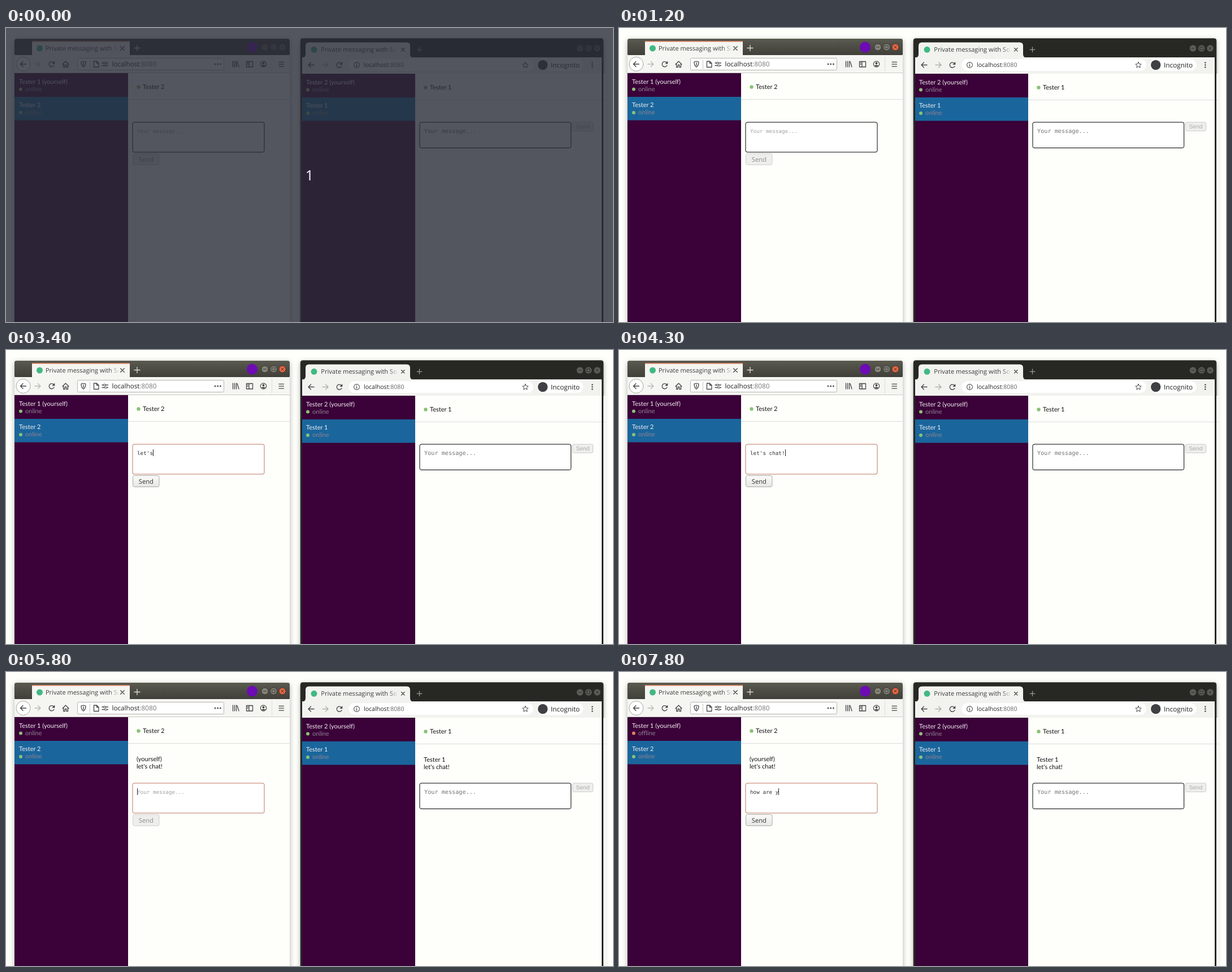
An HTML page that plays this animation: 1074x521 px, repeating every 8000 ms.

```html
<!DOCTYPE html>
<html lang="en">
<head>
<meta charset="utf-8">
<title>Private chat demo</title>
<style>
  html, body { margin: 0; width: 100%; height: 100%; overflow: hidden; background: #fefffb; }
  svg { display: block; width: 1074px; height: 521px; text-rendering: geometricPrecision; white-space: pre; }
  .ui { font-family: "Open Sans", "Noto Sans", sans-serif; }
  .page { font: 11px Lato, sans-serif; }
  .mono { font-family: "DejaVu Sans Mono", monospace; }
  .line { fill: none; stroke: #454545; stroke-width: 1.3; stroke-linecap: round; stroke-linejoin: round; }
</style>
</head>
<body>
<svg id="stage" viewBox="0 0 1074 521"></svg>
<script>
const LOOP = 8000, CHAR = 5.6;
const $ = id => document.getElementById(id);

const rect = (x, y, w, h, fill, extra = '') =>
  `<rect x="${x}" y="${y}" width="${w}" height="${h}" fill="${fill}" ${extra}/>`;
const disc = (x, y, r, fill, extra = '') =>
  `<circle cx="${x}" cy="${y}" r="${r}" fill="${fill}" ${extra}/>`;
const line = (d, extra = '') => `<path class="line" d="${d}" ${extra}/>`;
const label = (x, y, text, size, fill, cls = 'ui', extra = '') =>
  `<text x="${x}" y="${y}" class="${cls}" style="font-size:${size}px" fill="${fill}" ${extra}>${text}</text>`;

const cross = (x, y, r, extra) => line(`M${x - r} ${y - r}l${2 * r} ${2 * r}m0 ${-2 * r}l${-2 * r} ${2 * r}`, extra);
const plus = (x, y, r, color) => line(`M${x - r} ${y}h${2 * r}M${x} ${y - r}v${2 * r}`, `style="stroke:${color}"`);
const arrow = (x, y, dir, color) =>
  line(`M${x - 5 * dir} ${y}h${10 * dir}m${-4.5 * dir} -4.5l${4.5 * dir} 4.5l${-4.5 * dir} 4.5`, `style="stroke:${color}"`);
const reload = (x, y) =>
  line(`M${x + 4} ${y + 2.2}a4.6 4.6 0 1 1 -.3 -4.6`) +
  `<path d="M${x + 5.3} ${y - 5.5}v5h-5z" fill="#454545"/>`;

function windowButtons(xs, y, fill, ink, close = fill) {
  const style = `style="stroke:${ink};stroke-width:1"`;
  return xs.map((x, i) => disc(x, y, 6, i == 2 ? close : fill, 'stroke="#30302b" stroke-width=".8"')).join('') +
    line(`M${xs[0] - 2.5} ${y}h5M${xs[1] - 2.5} ${y - 2.5}h5v5h-5z`, style) +
    cross(xs[2], y, 2.2, style);
}

function user(y, name, id) {
  return label(23, y, name, 11, '#f4eef3', 'page') +
    disc(26, y + 9.8, 3, '#8bc176', `id="${id}Dot"`) +
    label(34, y + 13, 'online', 11, '#8f8292', 'page', `id="${id}"`);
}

function chat(id, me, other, width, author) {
  return rect(15, 80, width, 441, '#fefffb') +
    rect(15, 80, 201, 441, '#3a0238') + rect(15, 122, 201, 41.5, '#1a669c') +
    user(98.7, me + ' (yourself)', id + 'Me') + user(140.2, other, id + 'Other') +
    disc(234.5, 104.5, 3.2, '#8bc176') + label(242, 108, other, 11, '#111', 'page') +
    rect(216, 126, width - 201, 1, '#dcdddb') +
    `<g id="${id}Message">` +
      label(231, 157.5, author, 11, '#111', 'page', 'font-weight="bold"') +
      label(231, 170.7, "let's chat!", 11, '#111', 'page') +
    '</g>';
}

const leftBar = color => rect(15, 19, 487, 30, color, 'rx="4"');

const leftWindow =
  rect(15, 19, 487, 510, '#f5f5f1', 'rx="4" filter="url(#soft)"') +
  rect(15, 30, 487, 50, '#f5f5f1') + leftBar('url(#barIdle)') +
  windowButtons([458, 473.5, 489], 34, '#6b6a63', '#42413c') +
  '<g id="active">' +
    rect(15, 19, 487, 510, 'none', 'rx="4" filter="url(#lift)"') +
    leftBar('url(#barActive)') +
    windowButtons([458, 473.5, 489], 34, '#85847a', '#3c3b37', '#ec6540') +
  '</g>' +
  rect(46, 23, 173, 26, '#f5f5f1') + rect(46, 23, 173, 1.5, '#df7f5b') + rect(15, 48, 487, 31, '#f5f5f1') +
  rect(15, 79, 487, 1, '#cbcbc7') +
  disc(59.5, 36, 5.5, '#41b883') +
  label(70, 40, 'Private messaging with So', 11, 'url(#fadeL)') +
  cross(206, 36, 3.3) + plus(232, 35.5, 5, '#dedcd5') +
  disc(435.5, 34, 9.5, '#6d0bb4') +
  disc(30.5, 64, 12.5, '#fff', 'stroke="#a6a6a2"') + arrow(30.5, 64, -1, '#404040') + arrow(56, 64, 1, '#b8b8b5') +
  reload(81, 64) + line('M100 64.5l5.5 -5.5l5.5 5.5M101.7 63.5v6h2.6v-4h2.6v4h2.6v-6') +
  rect(126.5, 53.5, 259, 21, '#fff', 'rx="2" stroke="#b5b5b0"') +
  line('M137 59l4 1.2c0 5 -1.3 7.3 -4 9c-2.7 -1.7 -4 -4 -4 -9zM137 61.5v5') + rect(148, 56, 1, 17, '#c8c8c5') +
  line('M155.5 59h5l3.5 3.5v7h-8.5zM160.5 59v3.5h3.5') +
  line('M170 62h2m4 0h4.5M170 66.5h4.5m4 0h2') +
  disc(174, 62, 1.7, 'none', 'stroke="#454545"') + disc(176.5, 66.5, 1.7, 'none', 'stroke="#454545"') +
  label(187.5, 68.3, 'localhost<tspan fill="#777">:8080</tspan>', 11.7, '#222') +
  [370, 374.7, 379.4].map(x => disc(x, 64, 1.5, '#555')).join('') +
  line('M401.5 59v10M404.5 59v10M407.5 59v10M409 59.5l3 9.5') +
  line('M425.5 59.5h11v9.5h-11zM430 59.5v9.5M427.2 62h1M427.2 64.5h1') +
  disc(455.5, 64, 5.2, 'none', 'stroke="#454545" stroke-width="1.2"') + disc(455.5, 62.5, 1.9, '#454545') +
  '<path d="M452 66.5q3.5 -2 7 0q-3.5 3.5 -7 0z" fill="#454545"/>' +
  rect(470, 50, 1, 27, '#deded9') + line('M483 60.3h8.5M483 64.2h8.5M483 68.1h8.5') +
  chat('l', 'Tester 1', 'Tester 2', 487, '(yourself)') +
  '<g id="lForm">' +
    rect(224, 167, 233, 53, '#fff', 'id="box" rx="3" stroke="#000"') +
    label(232, 186, '', 9.3, '#333', 'mono', 'id="input"') +
    rect(0, 176, 1, 12, '#222', 'id="caret"') +
    rect(224.5, 222.5, 46.5, 20, '#eee', 'id="button" rx="3"') +
    label(234.8, 236.8, 'Send', 11.2, '#333', 'ui', 'id="send"') +
  '</g>';

const rightWindow =
  rect(521, 19, 536, 510, '#272824', 'rx="4" filter="url(#soft)"') +
  rect(521, 18.5, 536, 510, '#272824', 'rx="4" stroke="#484943" stroke-width=".7"') +
  '<path d="M524 52.5q6 0 6 -6v-15q0 -6 6 -6h173q6 0 6 6v15q0 6 6 6z" fill="#f2f3ef"/>' +
  rect(524, 52, 530, 29, '#f2f3ef') +
  disc(545, 38.3, 5.5, '#41b883') +
  label(557.3, 42.3, 'Private messaging with So', 11.1, 'url(#fadeR)') +
  cross(702.3, 38.3, 2.8) + plus(731.5, 38.3, 4.3, '#999a95') +
  windowButtons([1015.5, 1030.7, 1046], 36, '#5d5d57', '#2c2d29') +
  arrow(540, 65.5, -1, '#454545') + arrow(565, 65.5, 1, '#aeaeaa') + reload(590, 65.5) +
  rect(606.5, 55, 326.5, 21, '#fff', 'rx="10.5"') +
  disc(620.5, 65.5, 4.9, 'none', 'stroke="#555" stroke-width="1.1"') + line('M620.5 65v3M620.5 62.8v.1') +
  label(633, 69.3, 'localhost<tspan fill="#666">:8080</tspan>', 10.6, '#222') +
  line('M919 60.3l1.5 3.4l3.7 .4l-2.8 2.5l.8 3.6l-3.2 -1.9l-3.2 1.9l.8 -3.6l-2.8 -2.5l3.7 -.4z', 'style="stroke-width:1"') +
  rect(939.5, 55, 82, 21, '#fff', 'rx="10.5"') + disc(949.7, 65.5, 8.7, '#3f4043') +
  label(964, 69.5, 'Incognito', 11.8, '#222') +
  [61.5, 65.5, 69.5].map(y => disc(1037.3, y, 1.3, '#444')).join('') +
  '<g transform="translate(508 1)">' + chat('r', 'Tester 2', 'Tester 1', 538, 'Tester 1') + '</g>' +
  rect(521, 80, 3, 441, '#272824') + rect(1054, 80, 3, 441, '#272824') +
  '<g id="rForm">' +
    rect(732, 167, 267.7, 45.5, '#fff', 'rx="3" stroke="#000"') +
    label(740, 186, 'Your message...', 10.2, '#757575', 'mono') +
    rect(1002.5, 167, 36, 15.3, '#efefee', 'rx="2" stroke="#cbcbca"') +
    label(1008.5, 178.3, 'Send', 10.3, '#adadad', '', 'font-family="Liberation Sans, sans-serif"') +
  '</g>';

const gradient = (id, stops, box) =>
  `<linearGradient id="${id}" ${box}>${stops.map(([at, c, o = 1]) =>
    `<stop offset="${at}" stop-color="${c}" stop-opacity="${o}"/>`).join('')}</linearGradient>`;
const fade = (id, from, to) => gradient(id, [[0, '#3d3d3d'], [1, '#3d3d3d', 0]],
  `gradientUnits="userSpaceOnUse" x1="${from}" x2="${to}"`);
const vertical = (id, a, b) => gradient(id, [[0, a], [1, b]], 'x2="0" y2="1"');
const shadow = (id, blur, alpha) => `<filter id="${id}" x="-10%" y="-10%" width="120%" height="120%">
  <feDropShadow dx="0" dy="2" stdDeviation="${blur}" flood-opacity="${alpha}"/></filter>`;

$('stage').innerHTML = '<defs>' +
  fade('fadeL', 183, 201) + fade('fadeR', 677, 694) +
  vertical('barIdle', '#413f3b', '#3c3b37') + vertical('barActive', '#5b5a50', '#3f3e38') +
  vertical('buttonFill', '#fbfbfa', '#e6e6e3') +
  shadow('soft', 5, .3) + shadow('lift', 5, .2) + '</defs>' +
  rect(0, 0, 1074, 521, '#fefffb') + leftWindow + rightWindow +
  '<g id="intro">' + rect(0, 0, 1074, 521, 'rgb(40,44,55)', 'opacity=".8"') +
    label(537, 269.5, '1', 25, '#f0f0f0', '', 'font-family="Noto Sans, sans-serif" text-anchor="middle"') + '</g>';

// Typed text, including a corrected slip of the apostrophe.
const typing = [
  [0, ''], [2300, 'l'], [2400, 'le'], [2500, 'let'], [2600, 'let"'], [2700, 'let"s'],
  [3000, 'let"'], [3200, "let'"], [3400, "let's"], [3500, "let's "], [3600, "let's c"],
  [3800, "let's ch"], [3900, "let's cha"], [4000, "let's chat"], [4300, "let's chat!"],
  [4900, ''], [6200, 'h'], [6400, 'ho'], [6500, 'how'], [6600, 'how '], [6700, 'how a'],
  [6800, 'how ar'], [6900, 'how are'], [7000, 'how are '], [7500, 'how are y']
];

const set = (id, attrs) => { for (const k in attrs) $(id).setAttribute(k, attrs[k]); };
const show = (id, on) => set(id, { visibility: on ? 'visible' : 'hidden' });

function render(t) {
  const text = typing.findLast(([at]) => at <= t)[1];
  const focused = t >= 1500 && t < 4600 || t >= 5800;
  const pressed = t >= 4600 && t < 4900;
  const sent = t >= 4900, offline = t >= 7800;

  show('intro', t < 400);
  set('active', { opacity: t < 1100 ? 0 : t < 1200 ? .5 : 1 });

  for (const side of ['l', 'r']) {
    show(side + 'Message', sent);
    set(side + 'Form', { transform: `translate(0 ${sent ? 30 : 0})` });
  }

  $('input').textContent = text || 'Your message...';
  set('input', { fill: text ? '#333' : '#a2a2a2' });
  set('box', { stroke: focused ? '#bd7460' : '#000' });
  set('caret', { x: Math.round(232 + CHAR * text.length) });
  show('caret', focused && !(t >= 7000 && t < 7400));

  set('button', {
    fill: pressed ? '#d6d6d3' : text ? 'url(#buttonFill)' : '#eeeeec',
    stroke: text ? '#aaaaa5' : '#cfcfcc'
  });
  set('send', { fill: text ? '#333' : '#8c8c8a' });

  $('lMe').textContent = offline ? 'offline' : 'online';
  set('lMeDot', { fill: offline ? '#e08060' : '#8bc176' });
}

const start = performance.now();
function tick() {
  render((performance.now() - start) % LOOP);
  requestAnimationFrame(tick);
}
tick();
</script>
</body>
</html>
```
